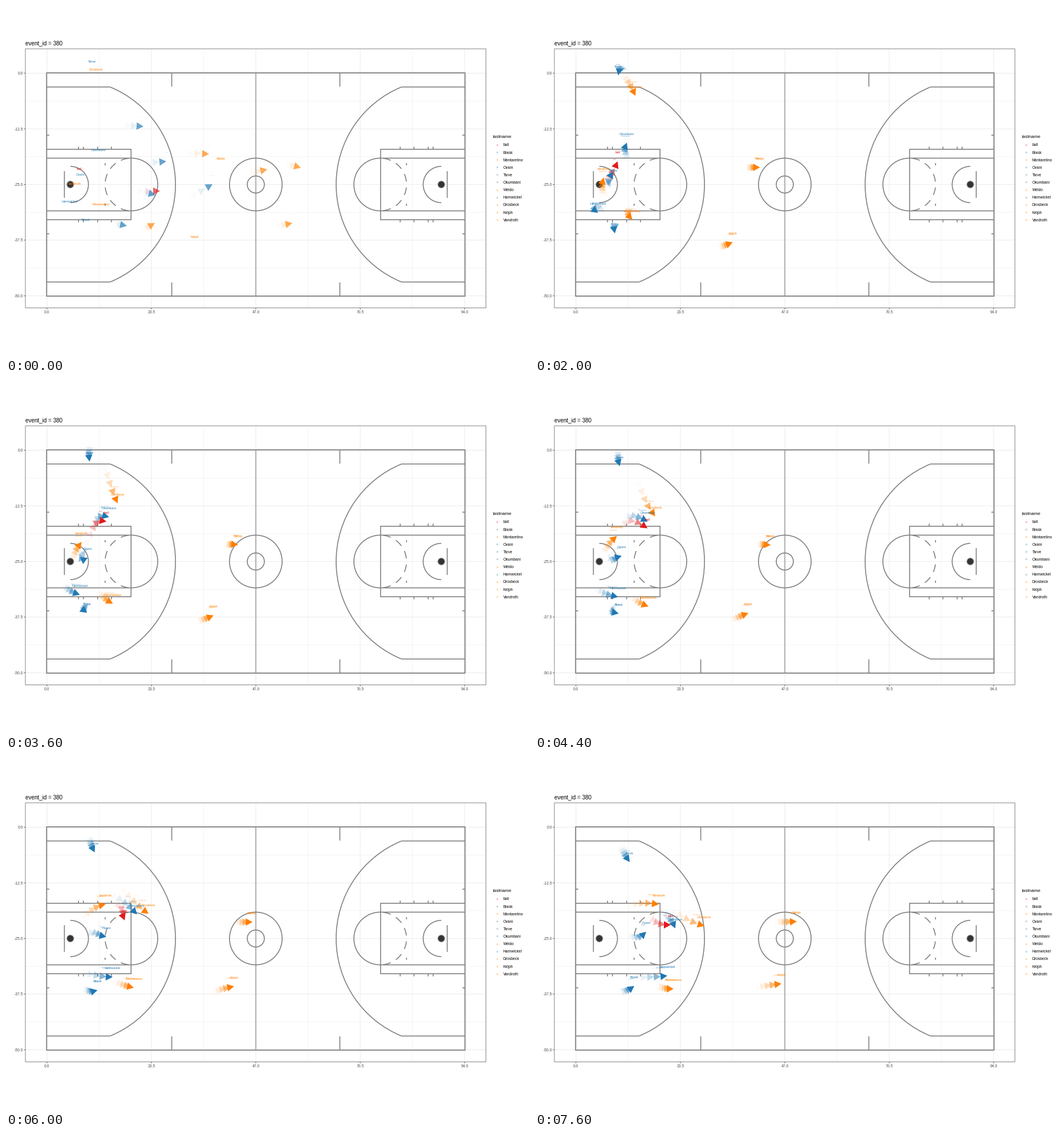
A matplotlib script for the animation above (8 s loop, 917 px wide and 611 px high).

```python
import numpy as np
import matplotlib.pyplot as plt
from matplotlib.animation import FuncAnimation
from matplotlib.patches import Arc, Circle, Polygon, Rectangle

W, H, DPI = 917, 611, 100
FRAMES, INTERVAL = 20, 400
PX = 72 / DPI
RED, BLUE, ORANGE = "#e31a1c", "#1f78b4", "#ff7f00"
COURT = "#7f7f7f"
FOOT = 7.79                    # pixels per foot
CX, CY = 438, 312.5            # centre spot
INK = .08                      # half the width of a painted line, in feet
WAKE = 5
LABEL_RISE, LABEL_SIZE = 15.7, 5.8

plt.rcParams["font.family"] = "Liberation Sans"
plt.rcParams["path.snap"] = False
fig = plt.figure(figsize=(W / DPI, H / DPI), dpi=DPI, facecolor="white")
ax = fig.add_axes([0, 0, 1, 1])
ax.set_xlim(0, W)
ax.set_ylim(H, 0)
ax.axis("off")


def px(feet):
    return CX + (feet - 47) * FOOT


def py(feet):
    return CY + (feet - 25) * FOOT


def write(x, y, text, size, color="black", ha="left", **kw):
    """Text whose cap height is centred on y; size in pixels."""
    return ax.text(x, y + .36 * size, text, fontsize=size * PX, color=color,
                   ha=ha, va="baseline", **kw)


def line(x0, y0, x1, y1, color=COURT, width=1.6, z=2):
    ax.plot([x0, x1], [y0, y1], color=color, lw=width * PX, zorder=z,
            solid_capstyle="butt")


def frame_box(x0, y0, x1, y1, color, width):
    ax.add_patch(Rectangle((x0, y0), x1 - x0, y1 - y0, fill=False, ec=color,
                           lw=width * PX, zorder=3))


def ring(x, radius, start=0, end=360):
    size = 2 * radius * FOOT
    ax.add_patch(Arc((px(x), CY), size, size, theta1=start, theta2=end,
                     color=COURT, lw=1.6 * PX, zorder=2))


def draw_panel():
    left, right, top, bottom = 34, 841.5, 75, 528.5
    for k in range(9):
        x, y = px(11.75 * k), py(6.25 * k)
        width = .5 if k % 2 else 1
        line(x, top, x, bottom, "#ebebeb", width, 1)
        line(left, y, right, y, "#ebebeb", width, 1)
        if k % 2 == 0:
            line(x, bottom, x, bottom + 2.7, "#333333", .8)
            line(left - 2.7, y, left, y, "#333333", .8)
            write(x, 536, f"{11.75 * k:.1f}", 6.8, "#4d4d4d", "center")
            write(30, y, f"{-6.25 * k:.1f}" if k else "0.0", 6.8, "#4d4d4d", "right")
    frame_box(left, top, right, bottom, "#777777", .9)
    write(34, 64.5, "event_id = 380", 9.9)


def draw_half(mirror):
    """One end of the court, in feet from its own baseline."""
    def fx(x):
        return 94 - x if mirror else x

    def seg(x0, y0, x1, y1):
        for a, b in ((y0, y1), (50 - y0, 50 - y1)):
            line(px(fx(x0)), py(a), px(fx(x1)), py(b))

    def arc(x, radius, half, middle=0):
        middle = 180 - middle if mirror else middle
        ring(fx(x), radius, middle - half, middle + half)

    three, rim, lane = 23.75 - INK, 5.25, 19 - INK
    wing = np.arcsin((22 - INK) / three)
    corner = rim + three * np.cos(wing)
    seg(0, 3 + INK, corner, 3 + INK)
    arc(rim, three, np.degrees(wing))
    seg(28 + INK, 0, 28 + INK, 3)
    for y in (17 + INK, 19 + INK):
        seg(0, y, lane, y)
    seg(lane, 17, lane, 25)
    arc(19, 6 - INK, 90)
    for k in range(6):
        arc(19, 6 - INK, 8.5, 105 + 30 * k)
    for x in (7.1, 8.2, 11.4, 14.5):
        seg(x, 16.5, x, 17)
    seg(13 + INK, 20.2, 13 + INK, 20.7)
    seg(0, 14 - INK, .5, 14 - INK)
    seg(4 - INK, 22, 4 - INK, 25)
    arc(rim, 4 + INK, 90)
    ax.add_patch(Circle((px(fx(rim)), CY), .75 * FOOT, fc="#333333", ec=COURT,
                        lw=1.2 * PX, zorder=2))


def draw_court():
    frame_box(px(-INK), py(-INK), px(94 + INK), py(50 + INK), COURT, 1.8)
    draw_half(False)
    draw_half(True)
    line(CX, py(0), CX, py(50), "#b8b8b8", 2.4)
    ring(47, 6 - INK)
    ring(47, 2 - INK)


def smooth_path(points):
    """Cubic Hermite curve through points spread evenly over the loop."""
    p = np.array(points, float)
    slope = np.gradient(p, axis=0, edge_order=2)
    u = np.linspace(0, len(p) - 1, FRAMES)
    k = np.minimum(u.astype(int), len(p) - 2)
    s = (u - k)[:, None]
    return ((1 + 2 * s) * (1 - s) ** 2 * p[k] + s * (1 - s) ** 2 * slope[k]
            + s * s * (3 - 2 * s) * p[k + 1] + s * s * (s - 1) * slope[k + 1])


class Mover:
    """A labelled marker; before its path it rests where an earlier run ended."""

    def __init__(self, name, color, points, rest, angle, speed):
        self.name, self.color = name, color
        self.path = smooth_path(points) + (0, LABEL_RISE)
        a = np.radians(angle)
        self.rest = np.array(rest)
        self.step = speed * np.array([np.cos(a), -np.sin(a)])

    def tip(self, i):
        return self.path[i] if i >= 0 else self.rest + min(i + 2, 0) * self.step

    def heading(self, i):
        d = self.step if i < 0 else self.path[i] - self.path[i - 1]
        return d / max(np.hypot(*d), 1e-6)


movers = [
    Mover("ball", RED, [(128, 285), (139, 270), (162, 226), (200, 241),
                        (209, 266), (238, 273)], (270, 324), 0, 14),
    Mover("Brask", BLUE, [(140, 374), (140, 382), (143, 387), (158, 388),
                          (174, 380)], (212, 385), -12, 5),
    Mover("Montarelino", ORANGE, [(166, 347), (170, 358), (190, 372), (220, 382),
                                  (243, 385)], (261, 380), 30, 6),
    Mover("Ovani", BLUE, [(130, 295), (136, 287), (139, 292), (154, 287),
                          (177, 294), (195, 285)], (262, 331), -15, 5),
    Mover("Tarve", BLUE, [(151, 97), (146, 105), (147, 124), (154, 143),
                          (166, 163)], (241, 211), -4, 10),
    Mover("Okumbani", BLUE, [(162, 252), (159, 229), (171, 217), (201, 229),
                             (231, 256), (246, 279)], (281, 272), 5, 12),
    Mover("Weldo", ORANGE, [(377, 267), (399, 267), (420, 268), (459, 267)],
          (356, 259), -2, 13),
    Mover("Harnwickel", BLUE, [(112, 342), (110, 346), (133, 356), (179, 364),
                               (232, 362)], (362, 312), 30, 15),
    Mover("Drosbeck", ORANGE, [(158, 111), (175, 139), (199, 201), (242, 248),
                               (297, 275)], (458, 286), 12, 9),
    Mover("Kelph", ORANGE, [(331, 404), (352, 396), (384, 384), (432, 376)],
          (517, 283), -15, 7),
    Mover("Vandroth", ORANGE, [(120, 311), (120, 286), (135, 260), (168, 238),
                               (217, 237)], (502, 380), 12, 7),
]


def draw_legend():
    write(854, 228, "lastname", 8.2)
    for k, m in enumerate(movers):
        y = 243 + 13.12 * k
        write(861, y, "a", 5, m.color, "center", alpha=.75)
        write(872, y, m.name, 6.8)


live = []


def draw_marker(m, i, age):
    tip = m.tip(i)
    alpha = (1 - age / WAKE) ** 1.0 * .8 ** (age * age / 2) if age else 1
    if i != 0:
        fwd = m.heading(i)
        side = 6.5 * np.array([-fwd[1], fwd[0]])
        base = tip - 12 * fwd
        live.append(ax.add_patch(Polygon(
            [tip, base + side, base - side], fc=m.color, ec="none",
            alpha=alpha * (.75 if age else 1), zorder=10 - age)))
    if i != -1:
        live.append(write(tip[0], tip[1] - LABEL_RISE, m.name,
                          LABEL_SIZE * .6 ** age, m.color, "center",
                          alpha=alpha * (.75 if age else 1), zorder=20 - age))


def reset():
    while live:
        live.pop().remove()
    return []


def update(frame):
    reset()
    for age in reversed(range(WAKE)):
        for m in movers:
            draw_marker(m, frame - age, age)
    return live


draw_panel()
draw_court()
draw_legend()
anim = FuncAnimation(fig, update, frames=FRAMES, init_func=reset,
                     interval=INTERVAL, repeat=True, repeat_delay=0, blit=False)
plt.show()
```
